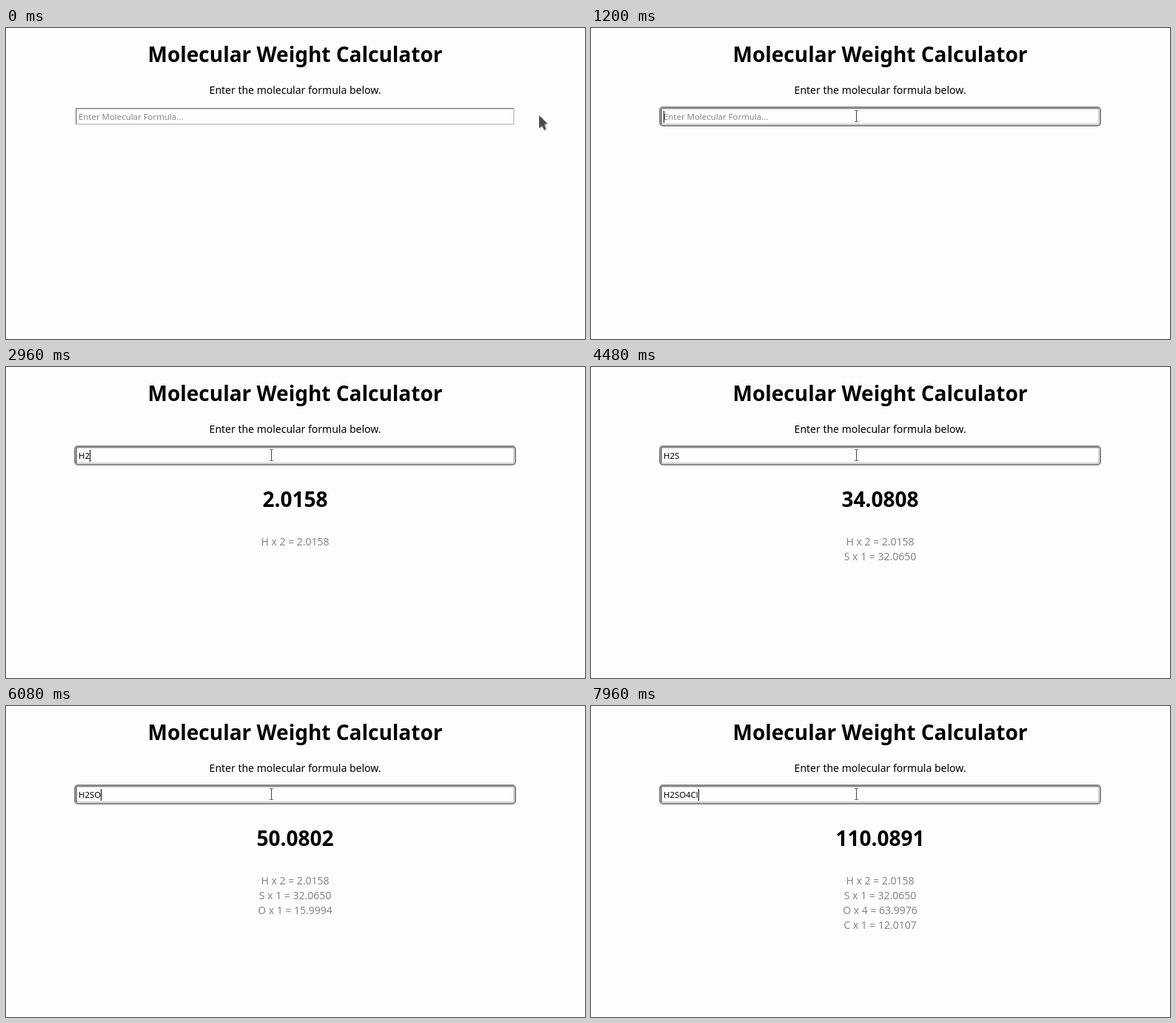
These frames come from a looping animation (782x420 px, 8000 ms). An HTML page with a canvas:

```html
<!DOCTYPE html>
<html lang="en">
<head>
<meta charset="utf-8">
<title>Molecular Weight Calculator</title>
<style>
  html, body { margin: 0; width: 100%; height: 100%; overflow: hidden; background: #fdfdfc; }
  canvas { display: block; }
</style>
</head>
<body>
<canvas id="stage" width="782" height="420"></canvas>
<script>
const ctx = document.getElementById('stage').getContext('2d');
const LOOP = 8000, MID = 390.5, FOCUS = 740, BLINK = 600, KEY_LAG = 100;
const PAPER = '#fdfdfc', GRAY = '#868686', RING = '#8a8a8a';
const MASS = { H: 1.0079, S: 32.065, O: 15.9994, C: 12.0107, Cl: 35.453 };
const KEYS = [[1900, 'H'], [2700, '2'], [3740, 'S'], [4880, 'O'], [6280, '4'], [7640, 'C'], [7920, 'l']];

const typedAt = t => KEYS.filter(k => k[0] <= t).map(k => k[1]).join('');

function text(s, x, y, size, color = '#000', weight = 400, align = 'center') {
  ctx.font = `${weight} ${size}px "Noto Sans", "Open Sans", sans-serif`;
  ctx.textAlign = align;
  ctx.fillStyle = color;
  ctx.fillText(s, x, y);
}

function box(x, y, w, h, color) {
  ctx.fillStyle = color;
  ctx.fillRect(x, y, w, h);
}

function field(focused) {
  box(94, 108, 593, 23, '#dcdcd8');
  box(94, 108, 592, 22, '#7c7c88');
  box(95, 109, 591, 21, '#cacaca');
  box(96, 110, 589, 19, '#fefefe');
  if (!focused) return;
  ctx.strokeStyle = RING;
  ctx.lineWidth = 2;
  ctx.beginPath();
  ctx.roundRect(93, 107, 595, 25, 4);
  ctx.stroke();
  box(94, 108, 592, 1, RING);
  box(94, 109, 2, 21, RING);
}

function results(formula) {
  if (!formula) return;
  let total = 0;
  [...formula.matchAll(/([A-Z][a-z]?)(\d*)/g)].forEach(([, el, n], i) => {
    const count = +n || 1, mass = MASS[el] * count;
    total += mass;
    text(`${el} x ${count} = ${mass.toFixed(4)}`, MID, 241 + 20 * i, 14, GRAY);
  });
  text(total.toFixed(4), MID, 189, 28, '#000', 700);
}

function caret(t, x) {
  const last = KEYS.reduce((a, k) => k[0] <= t ? k[0] : a, FOCUS);
  if (t >= FOCUS && Math.floor((t - last) / BLINK) % 2 === 0) box(Math.round(x), 112, 1, 16, '#000');
}

function pointer(t) {
  const u = Math.min(1, Math.max(0, (t - 40) / 600));
  const k = u * u * (3 - 2 * u), j = 1 - k;
  const curve = (a, b, c, d) => j*j*j*a + 3*j*j*k*b + 3*j*k*k*c + k*k*k*d;
  const x = curve(720, 640, 460, 358), y = curve(118, 175, 255, 119);
  ctx.save();
  ctx.translate(Math.round(x), Math.round(y));
  if (x < 687 && y > 108 && y < 131) {
    box(-2, -8, 5, 1, '#6a6a66');
    box(-2, 7, 5, 1, '#6a6a66');
    box(0, -7, 1, 14, '#484846');
  } else {
    ctx.fillStyle = '#4a4a4a';
    ctx.shadowColor = 'rgba(0,0,0,.35)';
    ctx.shadowBlur = 2;
    ctx.shadowOffsetX = ctx.shadowOffsetY = 1;
    ctx.beginPath();
    [[0, 0], [0, 17], [4, 14], [7, 20], [9, 18], [7, 12], [11, 11]].forEach(p => ctx.lineTo(...p));
    ctx.fill();
  }
  ctx.restore();
}

function draw(now) {
  const t = now % LOOP, typed = typedAt(t);
  box(0, 0, 782, 420, PAPER);
  text('Molecular Weight Calculator', MID, 46, 28, '#000', 700);
  text('Enter the molecular formula below.', MID, 89, 14);
  field(t >= FOCUS);
  text(typed || 'Enter Molecular Formula...', 98, 124, 11.4, typed ? '#000' : GRAY, 400, 'left');
  caret(t, 98 + (typed ? ctx.measureText(typed).width : 0));
  results(typedAt(t - KEY_LAG));
  pointer(t);
}

const start = performance.now();
function tick() {
  draw(performance.now() - start);
  requestAnimationFrame(tick);
}
tick();
</script>
</body>
</html>
```
